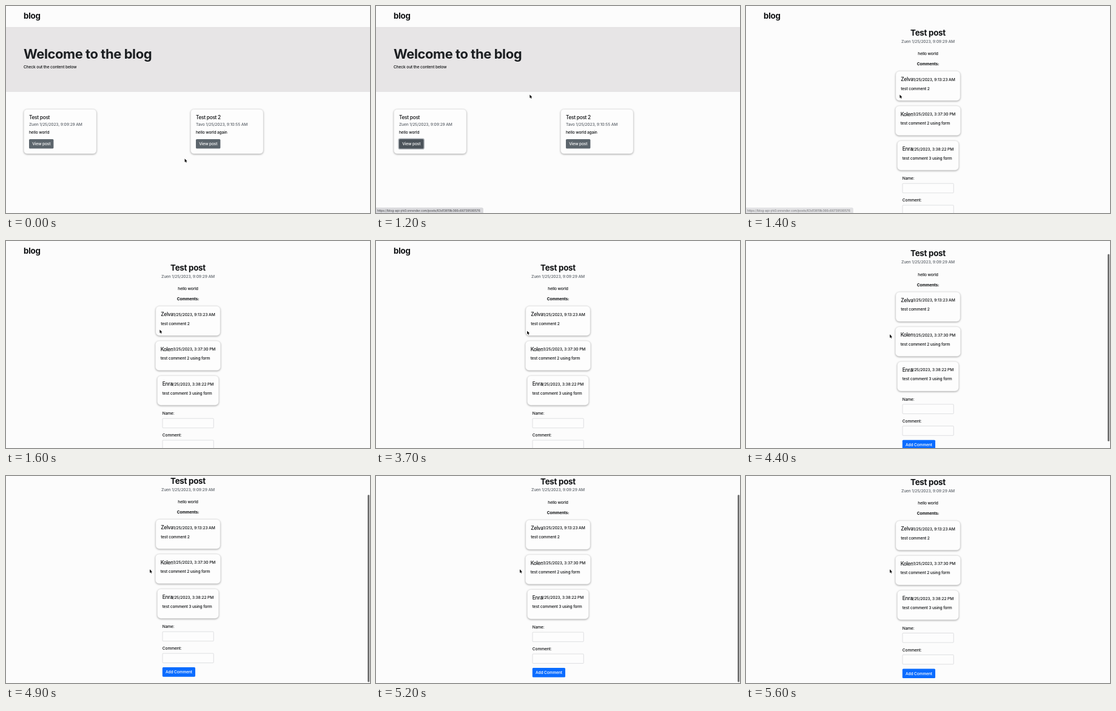
These frames come from a looping animation (600 by 342 pixels, 5700 ms). An HTML page:

```html
<!DOCTYPE html>
<html lang="en">
<head>
<meta charset="utf-8">
<title>blog</title>
<style>
html, body { margin: 0; width: 100%; height: 100%; overflow: hidden; background: #fcfcfc; }
svg { display: block; width: 100%; height: 100%; }
text { font: 450 6.667px Inter, "Liberation Sans", sans-serif; font-optical-sizing: none; letter-spacing: -.022em; fill: #0f1113; }
.hero { font-size: 22px; font-weight: 700; fill: #1b1e21; letter-spacing: -.02em; }
.head { font-size: 13.33px; font-weight: 700; letter-spacing: -.02em; }
.title { font-size: 8.33px; font-weight: 550; letter-spacing: -.034em; }
.meta { font-weight: 500; fill: #5d636a; }
.bold { font-weight: 700; }
.light { fill: #fff; }
.url { font-size: 5px; font-weight: 400; letter-spacing: 0; fill: #3c3d41; }
.mid { text-anchor: middle; }
.end { text-anchor: end; }
.card { fill: #fdfdfd; stroke: #d8d8d8; stroke-width: .4; filter: drop-shadow(0 1.3px 1.4px rgba(0, 0, 0, .34)); }
.input { fill: #fdfdfd; stroke: #c9cbce; stroke-width: .6; }
.hover { fill: #4b535a; }
.focus { stroke: #a9aeb3; stroke-width: 3; paint-order: stroke; }
</style>
</head>
<body>
<svg viewBox="0 0 600 342" preserveAspectRatio="none">
  <rect width="600" height="342" fill="#fcfcfc"/>
  <g id="home"></g>
  <g id="post"></g>
  <g id="status">
    <path d="M0 333.4H174.6Q176.4 333.4 176.4 335V342H0Z" fill="#dadadd" stroke="#c6c6c9" stroke-width=".4"/>
    <text class="url" x="2" y="339.8">https://blog-api-jrk0.onrender.com/posts/63d13819b366c66739590576</text>
  </g>
  <rect id="thumb" x="596.1" width="3" height="309.5" rx="1.5" fill="#707070"/>
  <path id="cursor" d="M0 0V5.7L1.3 4.6 2.2 6.6 3.1 6.2 2.3 4.2H4Z" stroke="#fff" stroke-width=".5" paint-order="stroke"/>
</svg>
<script>
const LOOP = 5700, STEP = 100;
const $ = id => document.getElementById(id);
const text = (x, y, str, cls = "") => `<text x="${x}" y="${y}" class="${cls}">${str}</text>`;
const rect = (x, y, w, h, r, attrs) => `<rect x="${x}" y="${y}" width="${w}" height="${h}" rx="${r}" ${attrs}/>`;

const preview = (x, title, meta, body, id) =>
  rect(x, 170.6, 119.6, 73.4, 5.5, 'class="card"') +
  text(x + 8.6, 187, title, "title") +
  text(x + 8.6, 198, meta, "meta") +
  text(x + 8.6, 210.5, body) +
  rect(x + 8.6, 220, 40.4, 15.6, 1.6, `id="${id}" fill="#5c656c"`) +
  text(x + 13.8, 230.2, "View post", "light");

const comment = ([width, name, date, body], i) => {
  const x = 300 - width / 2, y = 107.6 + 57.5 * i;
  return rect(x, y, width, 48.7, 6, 'class="card"') +
    text(x + 8.4, y + 16.6, name, "title") +
    text(x + width - 8.5, y + 16, date, "end") +
    text(x + 8.4, y + 30.9, body);
};

const field = (label, i) =>
  text(257.8, 287.4 + 35.9 * i, label) + rect(258, 293.2 + 35.9 * i, 84.2, 15.6, 1, 'class="input"');

const logo = text(29, 20.6, "blog", "head");

$("home").innerHTML = logo +
  '<rect y="35" width="600" height="106.5" fill="#e7e5e6"/>' +
  '<path d="M0 35.3H600M0 141.3H600" stroke="#d9d7d8" stroke-width=".5"/>' +
  text(29, 87, "Welcome to the blog", "hero") +
  text(29, 102.6, "Check out the content below") +
  preview(29.4, "Test post", "Zuen 1/25/2023, 9:09:29 AM", "hello world", "view") +
  preview(304.4, "Test post 2", "Tavo 1/25/2023, 9:10:55 AM", "hello world again", "view2");

$("post").innerHTML = logo +
  text(300, 48.8, "Test post", "head mid") +
  text(300, 60.6, "Zuen 1/25/2023, 9:09:29 AM", "meta mid") +
  text(300, 81.2, "hello world", "mid") +
  text(300, 98, "Comments:", "bold mid") +
  [
    [106.2, "Zelva", "1/25/2023, 9:13:23 AM", "test comment 2"],
    [107.4, "Kolen", "1/25/2023, 3:37:30 PM", "test comment 2 using form"],
    [101.2, "Enra", "1/25/2023, 3:38:22 PM", "test comment 3 using form"],
  ].map(comment).join("") +
  ["Name:", "Comment:"].map(field).join("") +
  rect(257.8, 352.1, 54.2, 15.6, 1.6, 'fill="#0a6cff"') +
  text(263, 362.3, "Add Comment", "light");

// Smooth progress from 0 to 1 between two times
function ease(t, from, to) {
  const p = Math.min(1, Math.max(0, (t - from) / (to - from)));
  return p * p * (3 - 2 * p);
}

// Cursor moves: from ms, to ms, x, y
const moves = [
  [0, 600, 68.5, 213],
  [600, 800, 62, 226],
  [900, 1200, 253.4, 146.4],
  [3600, 3900, 237, 154.2],
];

function cursorAt(t) {
  let x = 294.6, y = 252.2;
  for (const [from, to, toX, toY] of moves) {
    const p = ease(t, from, to);
    x += (toX - x) * p;
    y += (toY - y) * p;
  }
  return `${x} ${y}`;
}

// Two flicks down, then a small bounce back from the page end
const scrollAt = t =>
  23.4 * ease(t, 4000, 4400) + 12.6 * ease(t, 4600, 4900) - 2.3 * ease(t, 4900, 5600);

function draw(now) {
  const t = Math.floor(now % LOOP / STEP) * STEP;
  const onPost = t >= 1400, scroll = scrollAt(t);
  $("home").style.display = onPost ? "none" : "";
  $("post").style.display = onPost ? "" : "none";
  $("post").setAttribute("transform", `translate(0 ${-scroll})`);
  $("view").classList.toggle("hover", t >= 700);
  $("view").classList.toggle("focus", t >= 900);
  $("status").setAttribute("opacity", ease(t, 600, 700) - ease(t, 1300, 1600));
  $("thumb").setAttribute("opacity", ease(t, 4000, 4100) - ease(t, 5200, 5600));
  $("thumb").setAttribute("y", 1 + Math.min(scroll, 34) * .88);
  $("cursor").setAttribute("transform", `translate(${cursorAt(t)})`);
}

const start = performance.now();
function tick() {
  draw(performance.now() - start);
  requestAnimationFrame(tick);
}
tick();
</script>
</body>
</html>
```
